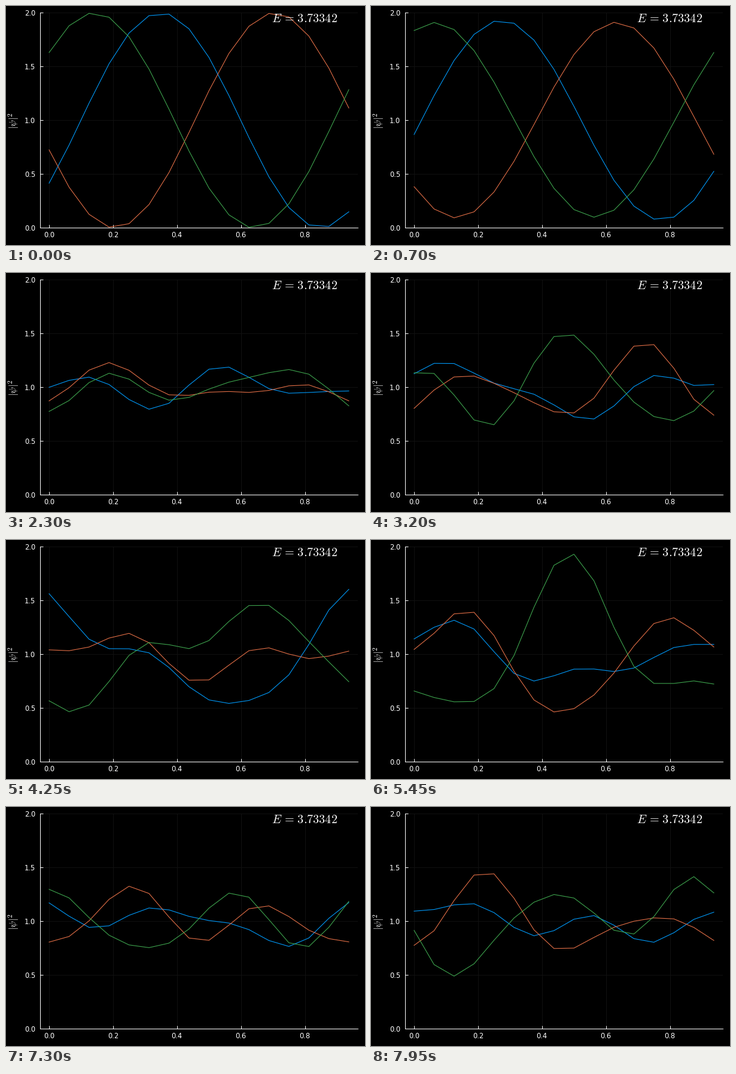
A matplotlib script that plays this animation: 600x400 px, repeating every 8 s.

```python
import numpy as np
import matplotlib.pyplot as plt
from matplotlib.animation import FuncAnimation

W, H, DPI = 600, 400, 72          # at 72 dpi one point is one pixel
FRAMES, STEP = 160, 50
SITES = 16
COLORS = ["#009AFA", "#E36F47", "#3EA44E"]
LEFT, RIGHT, TOP, BOTTOM = 57, 588, 11.3, 371.3

plt.rcParams.update({
    "font.family": "DejaVu Sans",
    "mathtext.fontset": "cm",
    "text.color": "white",
})

x = np.arange(SITES) / SITES
DRIFT = 1.97                      # leftward drift of all states, degrees per frame


def turn(degrees):
    return np.exp(1j * np.radians(degrees))


# First harmonic of each state in the drifting frame, at a few frames.
START = turn(np.array([125.8, 254.05, 50.95]))
key_frames = np.array([0, 17, 29, 64, 85, 109, 132, 159])
key_waves = np.array([
    START,
    0.84 * START,
    [-.095 + .119j, -.238 - .304j, .239 + .322j],
    [-.139 + .127j, .083 + .067j, .084 - .175j],
    [-.446 + .031j, -.095 - .022j, .371 + .139j],
    [-.155 - .153j, -.313 - .162j, .454 + .331j],
    [.054 - .018j, -.038 + .071j, .120 - .018j],
    [.109 - .006j, .141 + .058j, -.200 - .039j],
])
key_slopes = np.gradient(key_waves, key_frames, axis=0)
key_slopes[0] = 0

# Second harmonic: size, breathing, starting angle and rate of each state.
SIZE = np.array([0.12, 0.18, 0.23])
BREATH = np.array([-0.35, 0.4, 0.35])
ANGLE = np.array([116, 140, 176.6])
RATE = np.array([10.29, 4.09, -4.45])


def first_harmonic(n):
    """Cubic Hermite path through the key waves."""
    i = min(np.searchsorted(key_frames, n, side="right"), len(key_frames) - 1) - 1
    span = key_frames[i + 1] - key_frames[i]
    u = (n - key_frames[i]) / span
    ease = u * u * (3 - 2 * u)
    return ((1 - ease) * key_waves[i] + ease * key_waves[i + 1]
            + span * u * (1 - u) ** 2 * key_slopes[i]
            - span * u * u * (1 - u) * key_slopes[i + 1])


def density(n):
    """Three drifting harmonics; the upper two build up from nothing."""
    growth = 1 - np.exp(-(n / 40) ** 4)
    breath = 1 + BREATH * np.cos(2 * np.pi * (n - 64) / 46)
    second = growth * SIZE * breath * turn(ANGLE + RATE * n)
    third = np.full(3, growth * 0.075 * turn(96))
    waves = [first_harmonic(n), second, third]
    return 1 + sum((c[:, None] * turn(-m * (360 * x + DRIFT * n))).real
                   for m, c in enumerate(waves, 1))


fig = plt.figure(figsize=(W / DPI, H / DPI), dpi=DPI, facecolor="black")
ax = fig.add_axes([LEFT / W, 1 - BOTTOM / H,
                   (RIGHT - LEFT) / W, (BOTTOM - TOP) / H])
ax.set_facecolor("black")
margin = 0.03 * x[-1]
ax.set_xlim(-margin, x[-1] + margin)
ax.set_ylim(0, 2)
ax.set_xticks(np.arange(5) * 0.2)
ax.set_yticks(np.arange(5) * 0.5)
ax.xaxis.set_major_formatter("{x:.1f}")
ax.yaxis.set_major_formatter("{x:.1f}")
ax.tick_params(direction="in", length=5, width=1, color="white",
               labelcolor="white", labelsize=11.5)
ax.tick_params(axis="x", pad=6)
ax.tick_params(axis="y", pad=8)
ax.set_axisbelow(True)
ax.grid(color="#101010", linewidth=1)
for side, spine in ax.spines.items():
    spine.set_visible(side in ("left", "bottom"))
    spine.set_color("white")
    spine.set_linewidth(1)


def label(px, py, text, size, **kw):
    fig.text(px / W, 1 - py / H, text, fontsize=size, **kw)


label(443.8, 27, r"$E\hspace{0.16}=\hspace{0.14}3.73342$", 20.2,
      ha="left", va="baseline")
label(13, 192, r"$|\psi|^2$", 16.5, rotation=90, ha="center", va="center")

lines = [ax.plot(x, row, color=c, linewidth=1.1)[0]
         for row, c in zip(density(0), COLORS)]


def draw(frame):
    for line, row in zip(lines, density(frame)):
        line.set_ydata(row)
    return lines


anim = FuncAnimation(fig, draw, frames=FRAMES, interval=STEP, repeat=True)
plt.show()
```
